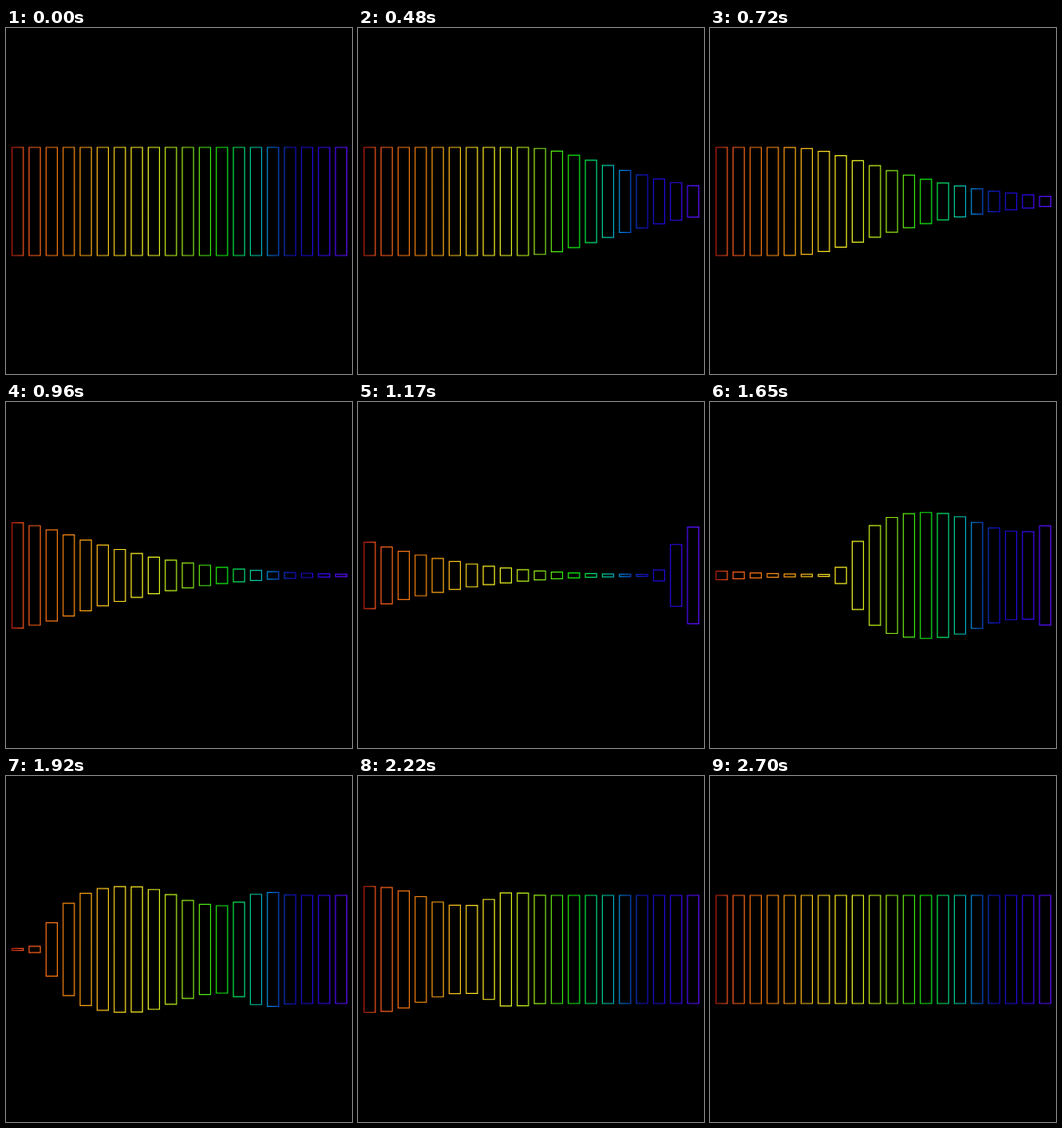
Recreate the animation shown at these times as an HTML page with a canvas. Size 400 px wide and 400 px high, loop 2910 ms.

```html
<!DOCTYPE html>
<html lang="en">
<head>
<meta charset="utf-8">
<title>Rainbow bars</title>
<style>
  html, body { margin: 0; width: 100%; height: 100%; overflow: hidden; background: #000; }
  canvas { display: block; width: 400px; height: 400px; }
</style>
</head>
<body>
<canvas id="stage" width="400" height="400"></canvas>
<script>
const ctx = document.getElementById('stage').getContext('2d');

const LOOP = 2910, MOVE = 2700, STEP = 30;
const COUNT = 20, STAGGER = 900 / (COUNT - 1);
const LEFT = 7, PITCH = 19.68, WIDTH = 13, MID = 200.5;

// time in ms, bar height, and the two bezier x handles of the ease leading there
const KEYS = [
  [0, 125],
  [1047, 2.3, 0.21, 0.29],
  [1322, 145.5, 0.25, 0.17],
  [1592, 101, 0.45, 0.56],
  [1716, 132, 0.42, 0.58],
  [1800, 125, 0.42, 0.58]
];

const COLORS = [
  [0, '#b01c0c'], [0.035, '#ee5020'], [0.12, '#ea6c10'], [0.22, '#f09a10'],
  [0.28, '#e8b818'], [0.34, '#f4dc20'], [0.41, '#e8e820'], [0.48, '#b4e818'],
  [0.54, '#78d814'], [0.59, '#34e010'], [0.635, '#08e40c'], [0.68, '#00d868'],
  [0.735, '#00b8a8'], [0.765, '#0084dc'], [0.8, '#0840c0'], [0.835, '#1010b4'],
  [0.89, '#1c08d0'], [0.94, '#3808e8'], [1, '#6010ff']
];

const rainbow = ctx.createLinearGradient(6, 0, 395, 0);
COLORS.forEach(([at, color]) => rainbow.addColorStop(at, color));

// cubic-bezier(a, 0, b, 1)
function ease(x, a, b) {
  let lo = 0, hi = 1;
  for (let n = 0; n < 24; n++) {
    const s = (lo + hi) / 2, r = 1 - s;
    if (3 * a * s * r * r + 3 * b * s * s * r + s * s * s < x) lo = s;
    else hi = s;
  }
  return lo * lo * (3 - 2 * lo);
}

function heightAt(t) {
  if (t <= 0) return KEYS[0][1];
  const k = KEYS.findIndex(key => key[0] > t);
  if (k < 0) return KEYS[KEYS.length - 1][1];
  const [t0, h0] = KEYS[k - 1], [t1, h1, a, b] = KEYS[k];
  return h0 + (h1 - h0) * ease((t - t0) / (t1 - t0), a, b);
}

function draw(t) {
  ctx.fillStyle = '#000';
  ctx.fillRect(0, 0, 400, 400);
  ctx.strokeStyle = rainbow;
  ctx.lineWidth = 1.2;
  ctx.beginPath();
  for (let i = 0; i < COUNT; i++) {
    const h = heightAt(t - (COUNT - 1 - i) * STAGGER);
    ctx.rect(LEFT + i * PITCH, MID - h / 2, WIDTH, h);
  }
  ctx.stroke();
}

const start = performance.now();
function tick() {
  const t = (performance.now() - start) % LOOP;
  draw(Math.min(MOVE, Math.floor(t / STEP) * STEP));
  requestAnimationFrame(tick);
}
tick();
</script>
</body>
</html>
```
